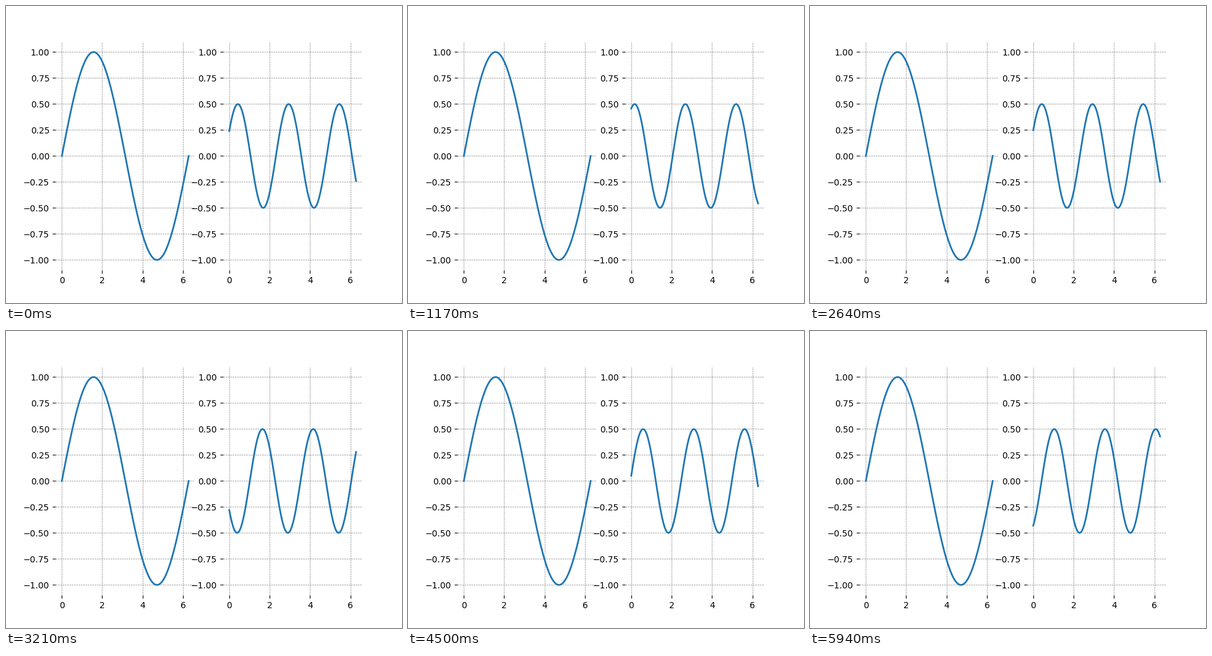
A matplotlib script that plays this animation: 640 px wide and 480 px high, repeating every 5970 ms.

```python
import numpy as np
import matplotlib.pyplot as plt
from matplotlib.animation import FuncAnimation

FRAMES = 199
INTERVAL = 30  # ms
STEP = 0.5     # phase advance per frame, in radians

x = np.linspace(0, 2 * np.pi, 100)


def wave(i):
    return 0.5 * np.sin(2.5 * x + STEP * (i + 1))


def style(ax):
    ax.grid(color="gray", linestyle="--", linewidth=0.5)
    for spine in ax.spines.values():
        spine.set_visible(False)


fig, (left, right) = plt.subplots(1, 2, figsize=(6.4, 4.8), dpi=100)
lines = [ax.plot(x, np.sin(x), color="#1f77b4", lw=2)[0] for ax in (left, right)]
for ax in (left, right):
    style(ax)
    ax.set_xlim(-0.1 * np.pi, 2.1 * np.pi)
    ax.set_ylim(-1.1, 1.1)
moving = lines[1]


def update(i):
    moving.set_ydata(wave(i))
    return (moving,)


anim = FuncAnimation(fig, update, frames=FRAMES, interval=INTERVAL,
                     repeat=True, repeat_delay=0, blit=False)
plt.show()
```
